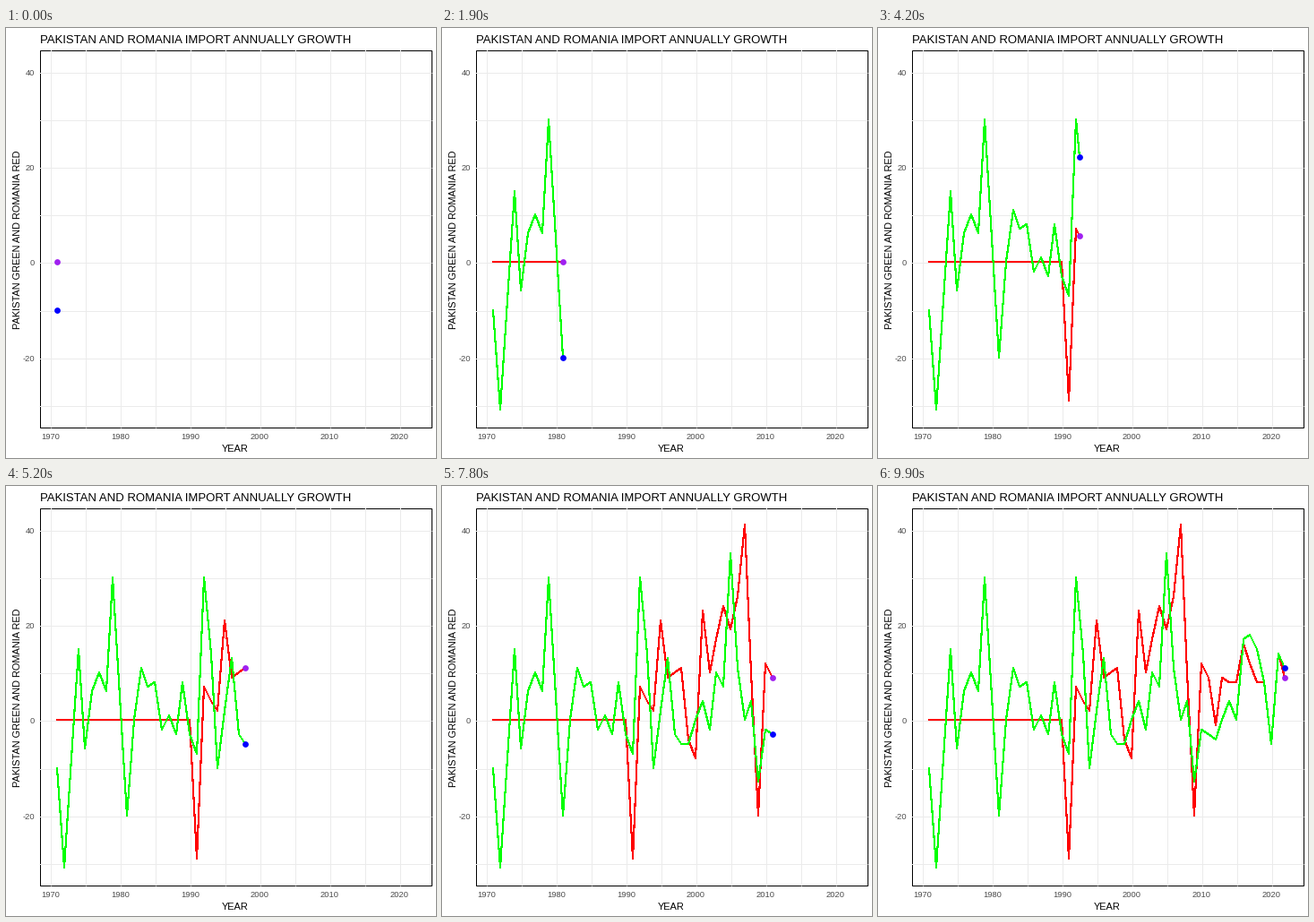
These frames come from a looping animation (480x480 px, 10000 ms). A matplotlib script:

```python
import matplotlib.pyplot as plt
import numpy as np
from matplotlib.animation import FuncAnimation
from matplotlib.collections import LineCollection
from matplotlib.patches import Circle, Rectangle

SIZE, DPI = 480, 72
FRAMES, INTERVAL = 100, 100
START, END = 1971, 2022
LEFT, RIGHT, TOP, BOTTOM = 37.5, 474.5, 24.5, 445.5
GRID, TICK = "#ebebeb", "#4d4d4d"

plt.rcParams["font.family"] = "Liberation Sans"

years = np.arange(START, END + 1)
# Each year lands on its nearest frame; frames in between are interpolated.
keys = np.round((years - START) * (FRAMES - 1) / (END - START))


def curve(first, points):
    """Yearly values from key points; None lies midway, earlier years are 0."""
    y = np.array(points, float)
    at = np.arange(first, first + len(y))
    known = ~np.isnan(y)
    return np.round(np.interp(years, at[known], y[known], left=0))


_ = None
pakistan = curve(1971, [
    -10, -31, _, 15, -6, 6, 10, 6, 30, _, -20, 0, 11, 7, 8, -2, 1, -3, 8,
    -3, -7, 30, 14, -10, _, 13, -3, -5, -5, _, 4, -2, 10, 7, 35, 11, 0, 4,
    -13, -2, _, -4, _, 4, 0, 17, 18, 15, 8, -5, 14, 11])
romania = curve(1990, [
    0, -29, 7, _, 2, 21, 9, _, 11, -4, -8, 23, 10, _, 24, 19, 26, 41, _,
    -20, 12, 9, -1, 9, _, 8, 16, _, 8, 8, -5, 14, 9])


def snap(v):
    return np.floor(np.asarray(v) + 0.3)


def px(year):
    return LEFT + (year - START + 2.55) * (RIGHT - LEFT) / 56.1


def py(value):
    return TOP + (44.6 - value) * (BOTTOM - TOP) / 79.2


fig = plt.figure(figsize=(SIZE / DPI, SIZE / DPI), dpi=DPI, facecolor="white")
ax = fig.add_axes([0, 0, 1, 1])
ax.set_xlim(0, SIZE)
ax.set_ylim(SIZE, 0)
ax.axis("off")


def rule(xs, ys):
    ax.plot(xs, ys, color=GRID, lw=1, solid_capstyle="butt", zorder=2)


def label(x, y, text, size, color="black", ha="center", va="baseline", **kw):
    ax.text(x, y, text, fontsize=size, color=color, ha=ha, va=va, **kw)


# The grid lies over the panel border.
ax.add_patch(Rectangle((LEFT, TOP), RIGHT - LEFT, BOTTOM - TOP, fc="white",
                       ec="black", lw=1, zorder=1))
for year in range(1970, 2021, 5):
    x = snap(px(year)) + 0.5
    rule([x, x], [TOP - 0.5, BOTTOM + 0.5])
    if year % 10 == 0:
        label(x, 459, str(year), 9.4, TICK)
for value in range(-30, 41, 10):
    y = snap(py(value)) + 0.5
    rule([LEFT - 0.5, RIGHT + 0.5], [y, y])
    if value % 20 == 0:
        label(32, y + 3.5, str(value), 9.4, TICK, ha="right")

label(37.5, 17, "PAKISTAN AND ROMANIA IMPORT ANNUALLY GROWTH", 13.1, ha="left")
label(255.5, 473, "YEAR", 11)
label(13, 236, "PAKISTAN GREEN AND ROMANIA RED", 11, va="center", rotation=90)


class Series:
    def __init__(self, values, line_color, dot_color, z):
        self.values = values
        # Aliased strokes also fill every pixel they touch.
        self.line = LineCollection([], colors=line_color, antialiaseds=False,
                                   capstyle="round", zorder=z)
        self.line.set_snap(False)
        self.dot = Circle((0, 0), 3.4, color=dot_color, lw=0, zorder=z + 2)
        ax.add_collection(self.line, autolim=False)
        ax.add_patch(self.dot)
        # Moderately steep segments come out thinner.
        step = np.abs(np.diff(values))
        self.widths = np.where((step == 2) | (step == 3), 0.5, 1.1)

    def reveal(self, frame):
        past = keys < frame
        year = np.append(years[past], np.interp(frame, keys, years))
        value = np.append(self.values[past],
                          np.interp(frame, keys, self.values))
        pts = np.column_stack([snap(px(year)), snap(py(value))])
        self.line.set_segments(list(np.stack([pts[:-1], pts[1:]], axis=1)))
        if len(pts) > 1:
            self.line.set_linewidths(self.widths[:len(pts) - 1])
        self.dot.center = tuple(pts[-1] + 0.5)


series = [Series(romania, "#ff0000", "#a020f0", 3),
          Series(pakistan, "#00ff00", "#0000ff", 4)]


def update(frame):
    for s in series:
        s.reveal(frame)
    return [a for s in series for a in (s.line, s.dot)]


anim = FuncAnimation(fig, update, frames=FRAMES, interval=INTERVAL,
                     repeat=True, repeat_delay=0, blit=False)
plt.show()
```
